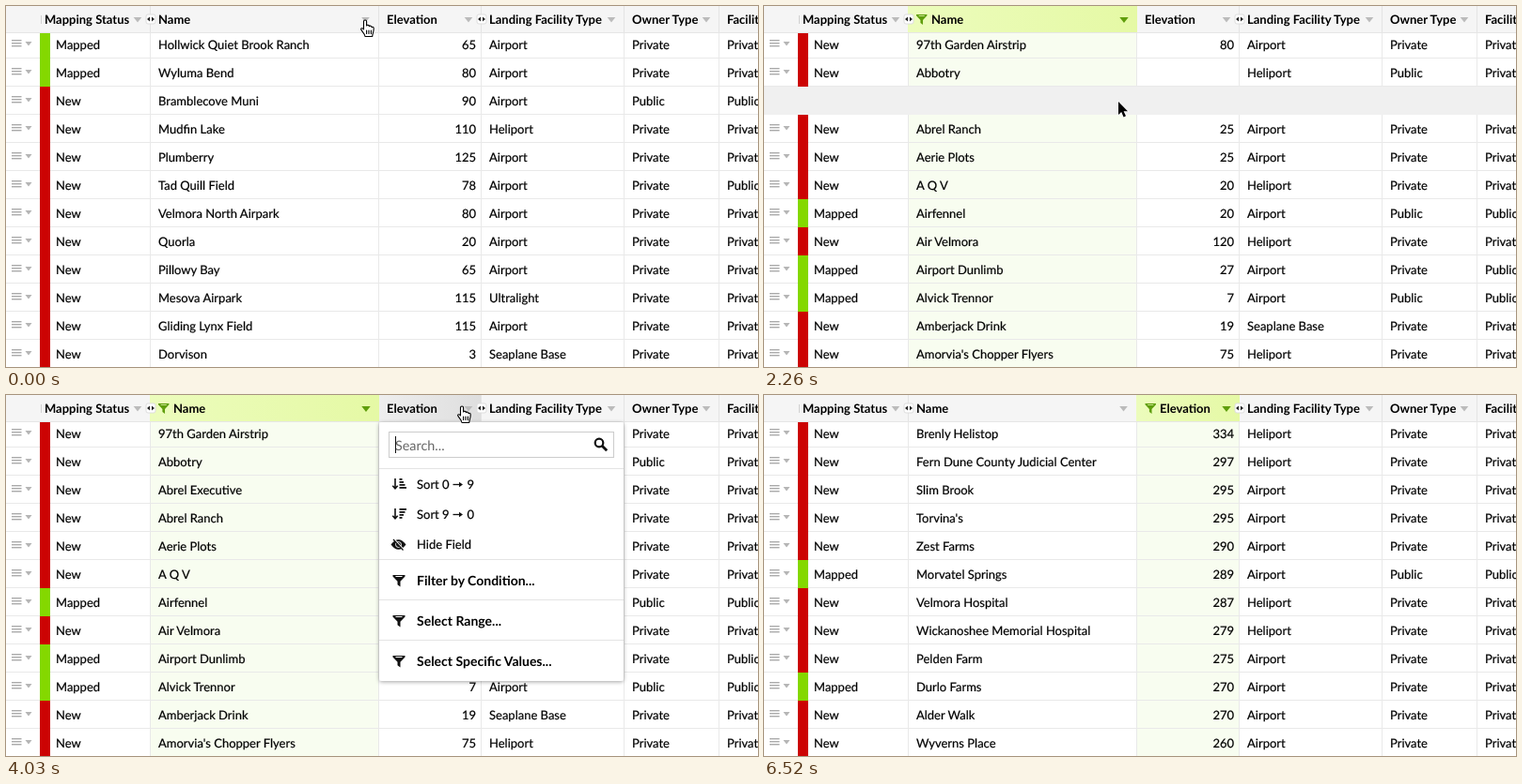
These frames come from a looping animation (800x385 px, 7890 ms). An HTML page:

```html
<!DOCTYPE html>
<html lang="en">
<head>
<meta charset="utf-8">
<title>Sorting a table</title>
<style>
  html, body { margin: 0; width: 100%; height: 100%; overflow: hidden; background: #fff; }
  svg { display: block; width: 100vw; height: 100vh; }
  text {
    font: 13px Lato, sans-serif; text-rendering: geometricPrecision; white-space: pre;
    fill: #000; stroke: #000; stroke-width: .2px;
  }
  .bold { font-weight: 700; stroke: none; }
  .large { font-size: 14px; }
  .num { text-anchor: end; }
  .hint { font-size: 14.4px; fill: #666; stroke: none; }
</style>
</head>
<body>
<svg id="stage" viewBox="0 0 800 385">
  <defs>
    <linearGradient id="lime"><stop stop-color="#ecfcbc"/><stop offset="1" stop-color="#e5f9a5"/></linearGradient>
    <linearGradient id="grey"><stop stop-color="#eee"/><stop offset="1" stop-color="#dedede"/></linearGradient>
    <filter id="shadow" x="-10%" y="-10%" width="120%" height="120%">
      <feDropShadow dx="0" dy="1" stdDeviation="2" flood-opacity=".36"/>
    </filter>
    <path id="funnel" fill-rule="evenodd" d="M0 0H13V1.4L8 6.8V12.5L5 10.3V6.8L0 1.4ZM2.6 1.1H10.4L9.6 2H3.4Z"/>
    <g id="arrow">
      <path d="M0 0V14L3.2 11L5.6 16.4L8 15.3L5.6 10.2H10Z" fill="#000" stroke="#fff" stroke-width="1.2" paint-order="stroke"/>
    </g>
    <g id="hand" stroke="#000" stroke-width="1.1" stroke-linejoin="round" stroke-linecap="round">
      <path d="M-1.5 1.5C-1.5-.5 1.6-.5 1.6 1.5V6C2 5 4.4 5 4.4 6.7C5 5.8 7 6 7 7.7C8 7 9.3 7.6 9.2 9C9.2 13 8 14 7.7 17.5H0C-.3 14.5-3 12.5-4.3 10C-4.7 8.5-2.8 8.3-1.5 10Z" fill="#fff"/>
      <path d="M1.6 11V14.5M4 11V14.5M6.4 11V14.5" fill="none"/>
    </g>
  </defs>
</svg>
<script>
const LOOP = 7890;
const GREEN = '#5f9e0c';
const TYPES = { A: 'Airport', H: 'Heliport', S: 'Seaplane Base', U: 'Ultralight' };
const STATUS = { M: ['Mapped', '#84d800'], N: ['New', '#cc0303'] };
const ACCESS = { V: 'Private', P: 'Public' };

// Each row: status, type, owner and use codes; elevation; name.
const unsorted = `MAVV 65 Hollwick Quiet Brook Ranch
MAVV 80 Wyluma Bend
NAPP 90 Bramblecove Muni
NHVV 110 Mudfin Lake
NAVV 125 Plumberry
NAVP 78 Tad Quill Field
NAVV 80 Velmora North Airpark
NAVV 20 Quorla
NAVV 65 Pillowy Bay
NUVV 115 Mesova Airpark
NAVV 115 Gliding Lynx Field
NSVV 3 Dorvison`;
const byName = `NAVV 80 97th Garden Airstrip
NHPV - Abbotry
NHVV 137 Abrel Executive
NAVV 25 Abrel Ranch
NAVV 25 Aerie Plots
NHVV 20 A Q V
MAPP 20 Airfennel
NHVV 120 Air Velmora
MAVP 27 Airport Dunlimb
MAPP 7 Alvick Trennor
NSVV 19 Amberjack Drink
NHVV 75 Amorvia's Chopper Flyers`;
const byElevation = `NHVV 334 Brenly Helistop
NHVV 297 Fern Dune County Judicial Center
NAVV 295 Slim Brook
NAVV 295 Torvina's
NAVV 290 Zest Farms
MAPP 289 Morvatel Springs
NHVV 287 Velmora Hospital
NHVV 279 Wickanoshee Memorial Hospital
NAVV 275 Pelden Farm
MAVV 270 Durlo Farms
NAVV 270 Alder Walk
NAVV 260 Wyverns Place`;

const rect = (x, y, w, h, fill, more = '') =>
  `<rect x="${x}" y="${y}" width="${w}" height="${h}" fill="${fill}" ${more}/>`;
const text = (x, y, s, cls = '') => `<text x="${x}" y="${y}" class="${cls}">${s}</text>`;
const path = (d, more = '') => `<path d="${d}" ${more}/>`;
const triangle = (x, y, half, h, fill) => path(`M${x - half} ${y}h${2 * half}l${-half} ${h}z`, `fill="${fill}"`);
const funnel = (x, y, fill, scale = 1) =>
  `<use href="#funnel" transform="translate(${x} ${y}) scale(${scale})" fill="${fill}"/>`;

const stage = document.getElementById('stage');
const tracks = [];

// Adds a group that is visible only inside the given [from, to] spans.
function layer(markup, ...spans) {
  const g = document.createElementNS('http://www.w3.org/2000/svg', 'g');
  g.innerHTML = markup;
  stage.append(g);
  if (spans.length) tracks.push({ g, spans });
  return g;
}

function rows(data) {
  return data.split('\n').map((line, i) => {
    const [code, elevation, ...name] = line.split(' ');
    const [label, color] = STATUS[code[0]];
    const y = 46 + 30 * i;
    return rect(36, y - 20, 11, 30, color) +
      text(53, y, label) + text(162, y, name.join(' ')) +
      (elevation === '-' ? '' : text(500, y, elevation, 'num')) +
      text(514, y, TYPES[code[1]]) + text(666, y, ACCESS[code[2]]) + text(767, y, ACCESS[code[3]]);
  }).join('');
}

function grid() {
  let out = '';
  for (let y = 26; y < 385; y += 30) {
    out += rect(0, y + 29, 800, 1, '#e9e9e9') + triangle(24, y + 12, 3.5, 4.5, '#b5b5b5');
    for (const dy of [10, 13, 16]) out += rect(6, y + dy, 10.5, 1.4, '#aaa');
  }
  for (const x of [153, 396, 505, 657, 758]) out += rect(x, 28, 1, 357, '#e9e9e9');
  return out;
}

function header() {
  let out = '';
  for (const x of [153, 396, 505, 657, 758]) out += rect(x, 0, 1, 28, '#e4e4e4');
  out += rect(37, 10, 1, 9, '#d0d0d0');
  for (const x of [140, 382.5, 492, 644, 745]) out += triangle(x, 12, 4.3, 5.5, '#bbb');
  return out + text(41, 19, 'Mapping Status', 'bold') + text(514, 19, 'Landing Facility Type', 'bold') +
    text(666, 19, 'Owner Type', 'bold') + text(767, 19, 'Facility Use', 'bold');
}

const resizer = x => rect(x - 5, 9, 10, 10, '#fff', 'rx="2" stroke="#ddd"') +
  path(`M${x - 1} 11.5v5l-3-2.5zM${x + 1} 11.5v5l3-2.5z`, 'fill="#222"');

const sortIcon = (y, widths) =>
  path(`M17 ${y}v10M14.3 ${y + 7.8}l2.7 3 2.7-3`, 'fill="none" stroke="#111" stroke-width="1.6"') +
  widths.map((w, i) => rect(21.5, y + 3 * i, w, 1.8, '#111')).join('');

const sortItem = (y, from, to, widths) => sortIcon(y - 11, widths) +
  text(40, y, 'Sort ' + from) + text(93.5, y, to) +
  path(`M78.5 ${y - 4.5}h8`, 'stroke="#111" stroke-width="1.3"') +
  path(`M85 ${y - 7.2}l4 2.7-4 2.7z`, 'fill="#111"');

function menu(x, low, high, filters, active, opens, presses, closes, carets) {
  const at = `<g transform="translate(${x} 29)">`;
  const height = 147 + 43 * filters.length;
  layer(at + rect(0, 0, 260, height, '#fff', 'rx="3" filter="url(#shadow)"') + '</g>', [opens, closes]);
  layer(at + rect(0, 50 + 32 * active, 260, 32, '#f0f0f0') + '</g>', [presses, closes]);
  let body = rect(10.5, 10.5, 239, 27, '#fff', 'stroke="#ccc"') + text(17, 29.5, 'Search...', 'hint') +
    '<circle cx="234" cy="22" r="4.3" fill="none" stroke="#111" stroke-width="2.2"/>' +
    path('M237.2 25.2l5 5', 'stroke="#111" stroke-width="2.8"') +
    rect(0, 49, 260, 1, '#e4e4e4') +
    sortItem(71, low, high, [3, 4.5, 6, 7.5]) + sortItem(103, high, low, [7.5, 6, 4.5, 3]) +
    path('M12.5 130.5Q20.5 120 28.5 130.5Q20.5 141 12.5 130.5Z', 'fill="#111"') +
    '<circle cx="20.5" cy="130.5" r="3" fill="none" stroke="#fff" stroke-width=".9"/>' +
    path('M16 125l10.5 11.5', 'stroke="#fff" stroke-width="1.8"') +
    path('M15 125l10.5 11.5', 'stroke="#111" stroke-width="1.2"') +
    text(40, 135, 'Hide Field');
  filters.forEach((label, i) => {
    const y = 174 + 43 * i;
    body += rect(0, y - 28, 260, 1, '#e4e4e4') + funnel(14.5, y - 11, '#111') + text(40, y, label, 'bold large');
  });
  layer(at + body + '</g>', [opens, closes]);
  layer(at + rect(17, 15, 1, 18, '#111') + '</g>', ...carets);
}

// Table body
layer(rect(154, 28, 242, 357, '#f8fdf0'), [1900, 5570]);
layer(rect(397, 28, 108, 357, '#f8fdf0'), [5570, LOOP]);
layer(grid());
layer(rows(unsorted), [0, 2260]);
layer(rows(byName), [2260, 5930]);
layer(rows(byElevation), [5930, LOOP]);
layer(rect(0, 86, 800, 30, '#f0f0f0'), [2260, 2380]);
layer(rect(0, 86, 800, 30, '#f0f0f0', 'opacity=".5"'), [2380, 2490]);

// Header
layer(rect(0, 0, 800, 28, '#f5f5f5') + rect(0, 28, 800, 1, '#e6e6e6'));
layer(rect(154, 0, 242, 28, 'url(#grey)'), [600, 1900]);
layer(rect(397, 0, 108, 28, 'url(#grey)'), [4030, 5570]);
layer(header());
layer(rect(153, 0, 244, 28, 'url(#lime)'), [1900, 5570]);
layer(rect(396, 0, 110, 28, 'url(#lime)'), [5570, LOOP]);
layer(text(162, 19, 'Name', 'bold'), [0, 1900], [5570, LOOP]);
layer(funnel(162, 9, GREEN, .88) + text(178, 19, 'Name', 'bold') + triangle(383, 12, 4.7, 6, GREEN), [1900, 5570]);
layer(text(405, 19, 'Elevation', 'bold'), [0, 5570]);
layer(funnel(405.5, 9, GREEN, .88) + text(421, 19, 'Elevation', 'bold') + triangle(492, 12, 4.7, 6, GREEN), [5570, LOOP]);
layer(resizer(154) + resizer(506));

// Menus
menu(154, 'A', 'Z', ['Filter by Condition...', 'Select Specific Values...'],
  0, 600, 1660, 1900, [[600, 1190], [1660, 1780]]);
menu(397, '0', '9', ['Filter by Condition...', 'Select Range...', 'Select Specific Values...'],
  1, 4030, 5330, 5570, [[4030, 4510], [4980, 5450]]);

// Pointer stops: time, shape, tip position
const stops = [
  [0, 'hand', 382, 15], [830, 'hand', 382, 19], [950, 'arrow', 382, 36], [1070, 'arrow', 381, 58],
  [1190, 'arrow', 379, 84], [1310, 'arrow', 378, 108], [1430, 'arrow', 377, 102],
  [2970, 'arrow', 383, 97], [3090, 'arrow', 404, 77], [3210, 'arrow', 433, 48],
  [3320, 'hand', 462, 23], [3440, 'hand', 473, 17], [3560, 'hand', 481, 14], [3670, 'hand', 485, 12],
  [4510, 'hand', 485, 17], [4630, 'arrow', 484, 45], [4750, 'arrow', 481, 88],
  [4860, 'arrow', 477, 122], [4980, 'arrow', 475, 135],
  [6160, 'arrow', 477, 118], [6280, 'arrow', 485, 70], [6400, 'arrow', 491, 14], [6520, 'none', 0, 0]
];
const pointer = layer('<use/>').firstChild;

const start = performance.now();
function draw(now) {
  const t = Math.max(0, now - start) % LOOP;
  for (const { g, spans } of tracks) {
    g.style.display = spans.some(([from, to]) => t >= from && t < to) ? '' : 'none';
  }
  const [, shape, x, y] = stops.findLast(stop => stop[0] <= t);
  pointer.setAttribute('href', '#' + shape);
  pointer.setAttribute('transform', `translate(${x} ${y})`);
  requestAnimationFrame(draw);
}
draw(start);
</script>
</body>
</html>
```
